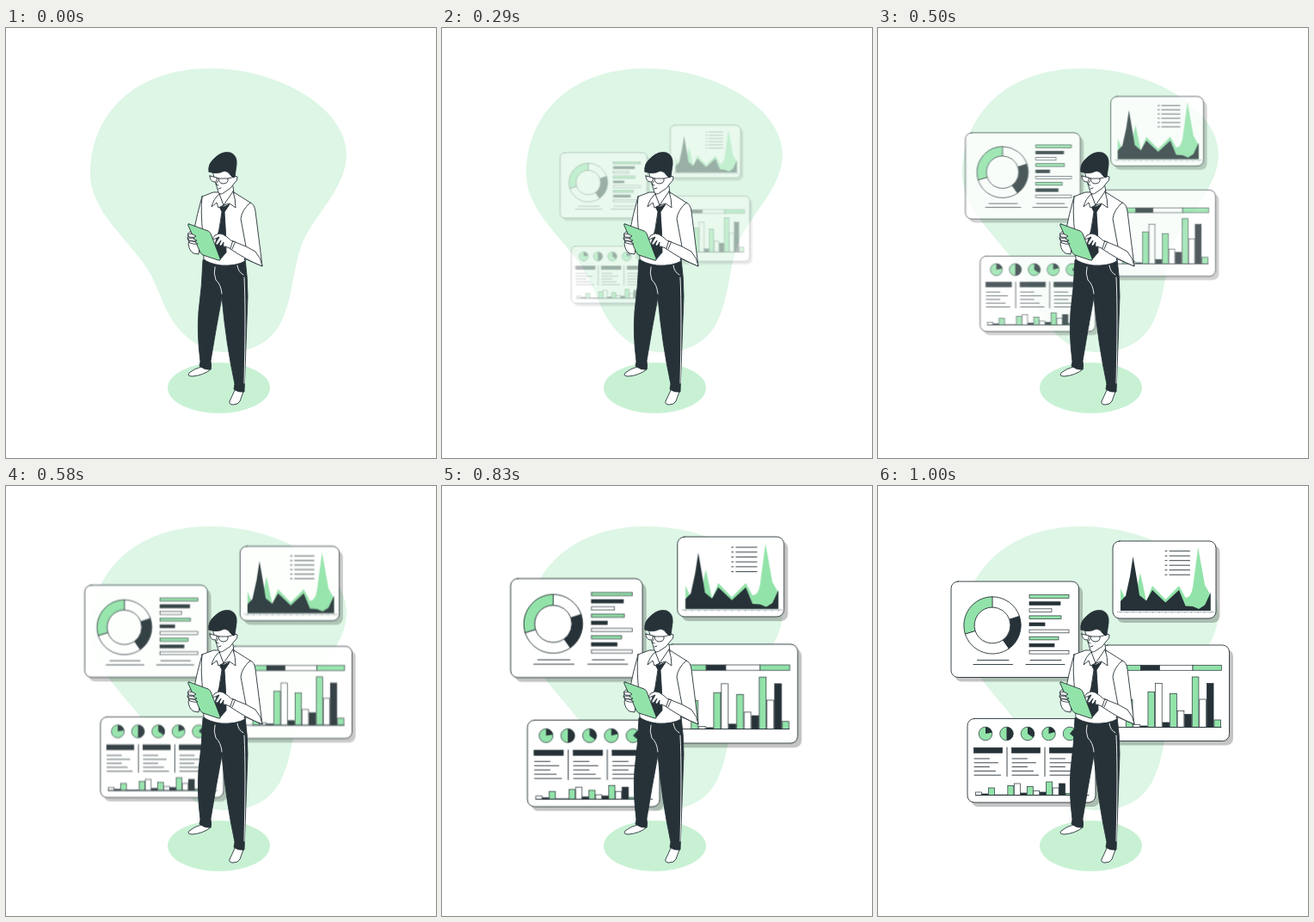
Recreate the animation shown at these times as an HTML page. Size 500 px wide and 500 px high, loop 1.04 s.

```html
<!DOCTYPE html>
<html lang="en">
<head>
<meta charset="utf-8">
<title>Dashboard</title>
<style>
  html, body { margin: 0; width: 100%; height: 100%; overflow: hidden; background: #fff; }
  svg { display: block; width: 100vw; height: 100vh; }
  .dark { fill: #263238; }
  .green { fill: #92e3a9; }
  .white { fill: #fff; }
  .line { fill: none; }
  .ink { stroke: #263238; stroke-width: .9; stroke-linecap: round; stroke-linejoin: round; }
  .thin { stroke: #263238; stroke-width: .7; }
  .chalk { fill: none; stroke: #fff; stroke-width: .9; stroke-linecap: round; }
  #panels { transform-origin: 249.3px 217.5px; animation: zoom 1040ms infinite; }
  @keyframes zoom {
    0%, 12.49% { opacity: 0; transform: scale(.545); }
    12.5% {
      opacity: .09; transform: scale(.545);
      animation-timing-function: cubic-bezier(.304, .329, .501, 1.351);
    }
    93.46%, 100% { opacity: 1; transform: scale(1); }
  }
</style>
</head>
<body>
<svg viewBox="0 0 500 500">
  <path fill="#ddf6e5" d="M98 170C98 100 150 47 237 47C320 47 396 95 396 147C396 185 358 218 345 249C334 276 334 310 322 337C312 362 290 377 255 377C222 377 197 352 184 322C176 303 171 290 163 278C142 246 98 212 98 170Z"/>
  <ellipse fill="#c8f1d4" cx="247.5" cy="418.5" rx="59.5" ry="29.5"/>
  <g id="panels"></g>

  <g class="ink">
    <!-- shoes and trousers -->
    <path class="white" d="M227 394Q219 396 213 401Q210 405 217 405Q229 404 238 397V392Z"/>
    <path class="white" d="M266 421Q263 428 260 434Q259 438 264 438Q270 438 272 434L276 423Z"/>
    <path class="dark" d="M229 270Q228 300 224 330Q222 356 226 388L225 393Q231 398 238 397Q239 392 238 387Q244 350 251 313Q256 368 266 414L265 420Q270 424 277 423Q279 370 281 312Q281 290 278 268Z"/>
    <path class="chalk" d="M243 278Q241 285 244 293Q250 298 251 309M269 276Q270 284 276 287M277 290Q279 330 277 413"/>

    <!-- shirt -->
    <path class="white" d="M228 196L241 191L265 191L284 203Q289 205 290 213L298 277L277 268L278 271Q268 277 250 276Q236 274 230 269L229 245L218 238Q222 217 228 196Z"/>
    <path class="line" d="M228 196Q226 214 229 240M284 203Q274 212 273 222L279 254"/>
    <path class="dark" d="M247 205L253 208L260 205L254 214Q256 240 256 261L249 269L242 255Q249 235 251 214Z"/>

    <!-- head -->
    <path class="white" d="M249 188L248 195L253 207L265 193L264 184Z"/>
    <path class="white" d="M241 170L244 181L247 191Q249 195 254 191Q262 187 265 181Q270 177 269 173Q267 171 264 174L263 166H244Z"/>
    <path class="dark" d="M236 167Q234 158 244 150Q252 143 261 145Q269 148 268 159L266 173Q263 174 261 171Q259 167 254 166Q245 171 236 167Z"/>
    <path class="line" d="M246 178L244 182L247 183M247 187L250 186"/>
    <path class="white" d="M237 172L245 174Q246 179 242 179Q237 178 237 172ZM247 175L258 175Q259 181 252 181Q247 180 247 175Z"/>
    <path class="line" d="M245 174L247 175M258 175L266 173"/>
    <path class="white" d="M248 193L253 206L247 209L245 203L239 208Q241 199 248 193ZM264 190L253 206L260 204L267 209Q267 199 264 190Z"/>

    <!-- tablet and hands -->
    <path class="white" d="M214 237Q210 239 212 242L211 244Q211 247 213 248L212 251Q213 259 218 262L224 263L226 250Z"/>
    <path class="green" d="M213 228L235 236Q237 237 238 239L249 268Q250 271 247 270L229 264Q227 263 226 261L212 230Q211 227 213 228Z"/>
    <path class="white" d="M212 240Q215 238 221 242Q220 244 213 243ZM212 244Q216 243 222 247Q219 249 213 247ZM213 248Q217 246 223 251Q219 252 214 250Z"/>
    <path class="white" d="M267 249Q261 248 257 243Q252 239 248 239Q242 240 240 245Q240 247 243 245L248 243L244 250Q243 253 246 252L250 247L248 252Q249 255 252 251L253 249Q252 256 255 254L262 257Z"/>
    <path class="white" d="M264 248L279 254L290 260Q297 268 298 277Q280 270 261 257Z"/>
    <path class="line" d="M266 250L263 257"/>
  </g>
</svg>
<script>
  const rect = (x, y, w, h, cls) =>
    `<rect x="${x}" y="${y}" width="${w}" height="${h}" class="${cls} thin"/>`;
  const line = (x1, y, x2) => `<path class="ink" d="M${x1} ${y}H${x2}"/>`;
  const shape = (d, cls) => `<path class="${cls}" d="${d}"/>`;
  const palette = ['green', 'dark', 'white'];

  // Angles in degrees, clockwise from the top.
  const polar = (cx, cy, r, deg) => {
    const a = (deg - 90) * Math.PI / 180;
    return `${(cx + r * Math.cos(a)).toFixed(2)} ${(cy + r * Math.sin(a)).toFixed(2)}`;
  };
  const ring = (cx, cy, r, inner, from, to, cls) => {
    const big = to - from > 180 ? 1 : 0;
    return shape(
      `M${polar(cx, cy, r, from)}A${r} ${r} 0 ${big} 1 ${polar(cx, cy, r, to)}` +
      `L${polar(cx, cy, inner, to)}A${inner} ${inner} 0 ${big} 0 ${polar(cx, cy, inner, from)}Z`,
      cls + ' ink');
  };
  const pie = (cx, cy, r, from, to) =>
    `<circle cx="${cx}" cy="${cy}" r="${r}" class="green thin"/>` +
    shape(`M${cx} ${cy}L${polar(cx, cy, r, from)}A${r} ${r} 0 0 1 ${polar(cx, cy, r, to)}Z`, 'dark');

  const panel = (x, y, w, h, body) =>
    `<rect x="${x + 4.5}" y="${y + 5}" width="${w}" height="${h}" rx="8" fill="#000" opacity=".23"/>` +
    `<rect x="${x}" y="${y}" width="${w}" height="${h}" rx="8" class="white ink"/>` + body;

  // Bars cycle green, white, dark, beginning at the given colour.
  const columns = (x, base, step, w, heights, first) => heights.map((h, i) =>
    rect(x + i * step, base - h, w, h, ['green', 'white', 'dark'][(i + first) % 3])).join('');

  function donutPanel() {
    const bars = [46, 36, 26, 37, 18, 46, 34, 29, 46].map((w, i) =>
      rect(176, 126.6 + i * 8.1, w, 3.7, palette[i % 3])).join('');
    const sectors = [[0, 72, 'white'], [72, 145, 'dark'], [145, 253, 'white'], [253, 360, 'green']]
      .map(([a, b, c]) => ring(133, 162, 33.2, 21, a, b, c)).join('');
    return panel(85, 111, 148.5, 111.5, sectors + bars +
      line(115.5, 202.5, 152) + line(111, 207.5, 156.5) +
      line(177, 202.5, 213) + line(172, 207.5, 217));
  }

  function areaPanel() {
    const back = 'M282 145V119L287 130L298.5 131L305 100.7L312 133.6L319 116L334.3 132L350 116L357.6 130Q364 130 366 118L372.2 71.6L380 115L386.7 127V145Z';
    const front = 'M282 145V134L288 127.8L293 105L296.5 82L301 108L304 127L312 133.6L319 121L334.3 135.5L350 121L357.6 139.5L366 140L373 143L380 138.5L386.7 124V145Z';
    let legend = '', ticks = 'M278 146.3H391';
    for (let i = 0; i < 6; i++) {
      const y = 75.7 + i * 5.5;
      legend += line(334, y, 336) + line(339, y, 362.5);
    }
    for (let i = 0; i < 15; i++) ticks += `M${282 + i * 7.5} 146.3v1.6`;
    return panel(273, 64, 120, 90, shape(back, 'green') + shape(front, 'dark') + legend +
      `<path d="${ticks}" fill="none" stroke="#78828a" stroke-width=".6"/>`);
  }

  function columnPanel() {
    const split = [[266, 305.5, 'green'], [305.5, 327.5, 'dark'], [327.5, 366, 'white'], [366, 399.5, 'green']]
      .map(([a, b, c]) => rect(a, 208.3, b - a, 6, c)).join('');
    return panel(259, 185, 149.5, 111.5, split +
      columns(288.3, 280.5, 8.55, 7.7, [32, 3, 1.5, 41, 51, 5.5, 39, 19, 15, 58.5, 32.5, 51, 8.5], 0) +
      line(266, 280.5, 399));
  }

  function reportPanel() {
    const pies = [[0, 80], [0, 180], [0, 125], [0, 75], [40, 130]]
      .map(([a, b], i) => pie(125 + i * 24.5, 288, 7.8, a, b)).join('');
    let text = '';
    for (let c = 0; c < 3; c++) {
      const x = 111.5 + c * 44;
      text += rect(x, 304.3, 33, 6, 'dark');
      [18, 28, 18, 25, 31].forEach((w, i) => text += line(x + .5, 317 + i * 4.8, x + w));
      if (c) text += `<path class="ink" d="M${x - 5.5} 304V337.5"/>`;
    }
    return panel(104, 270.5, 149, 97.5, pies + text +
      columns(113.5, 359.5, 7.47, 7, [3.5, 1.5, 8.5, .4, .4, 11, 13.5, 2.5, 10, 5, 3.5, 15.5, 8.5, 13.5, 2, 4], 1)
        .replace(/class="(\w+) thin"/g, 'class="$1 thin"') +
      line(113.5, 359.5, 245));
  }

  document.getElementById('panels').innerHTML =
    donutPanel() + areaPanel() + columnPanel() + reportPanel();
</script>
</body>
</html>
```
